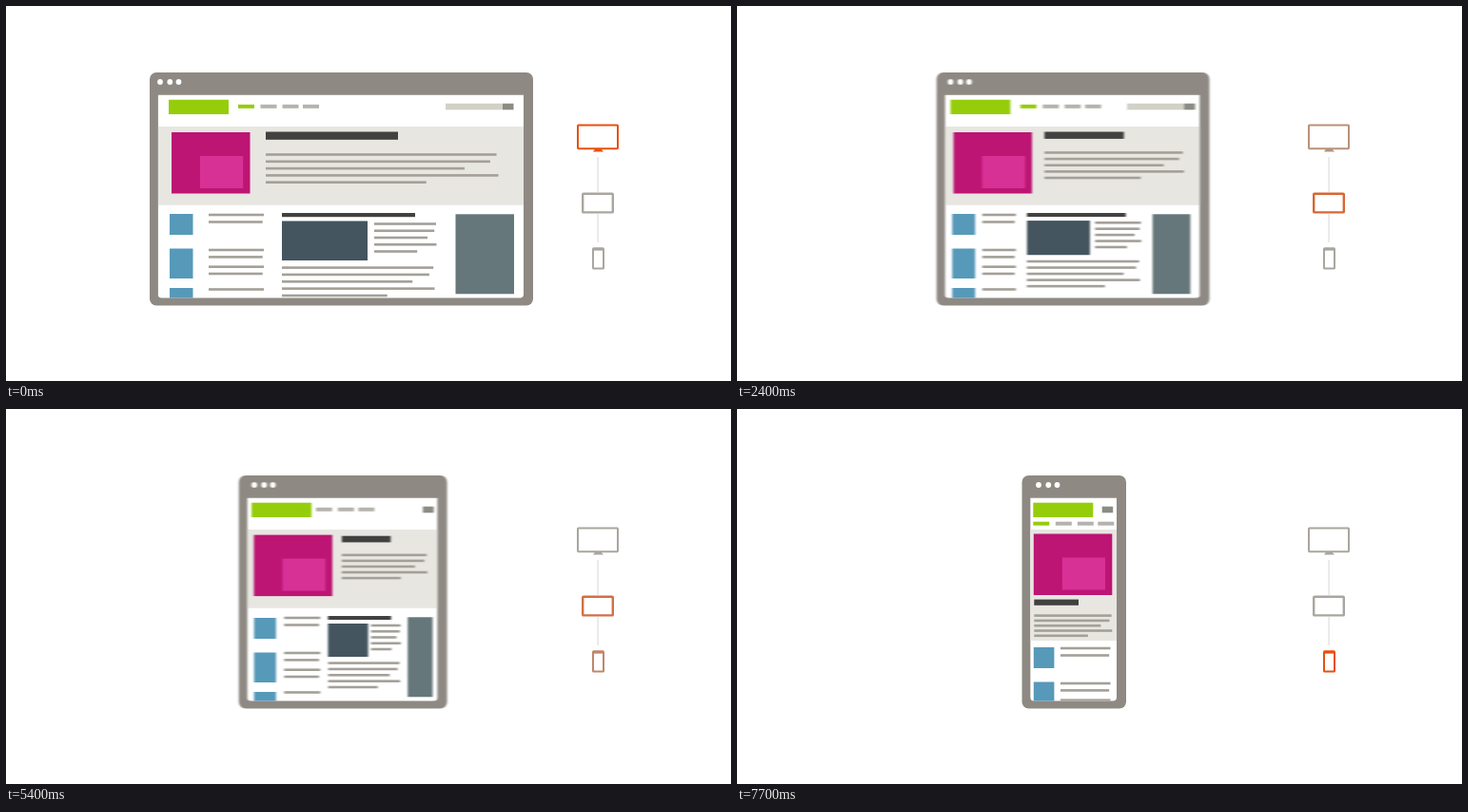
Recreate the animation shown at these times as an HTML page. Size 762 by 395 pixels, loop 8000 ms.

```html
<!DOCTYPE html>
<html lang="en">
<head>
<meta charset="utf-8">
<title>Responsive layout</title>
<style>
html, body { margin: 0; width: 100%; height: 100%; overflow: hidden; background: #fff; }
svg { display: block; width: 762px; height: 395px; }
</style>
</head>
<body>
<svg viewBox="0 0 762 395">
  <defs>
    <filter id="smear" filterUnits="userSpaceOnUse" x="0" y="0" width="762" height="395" color-interpolation-filters="sRGB">
      <feGaussianBlur stdDeviation="1.2 0"/>
    </filter>
    <clipPath id="page"><path id="pageShape"/></clipPath>
  </defs>
  <g id="scene"></g>
</svg>
<script>
const LOOP = 8000, STEP = 100;
const NAV_WRAP = 5600, STACK = 6300, BAR_HIDE = 2500;
const LINE = '#a3a098', DARK = '#424140';
const ORANGE = [232, 80, 15], GREY = [169, 166, 159];
const RAGGED = [.992, .965, .855, 1, .69];
const scene = document.getElementById('scene');
const pageShape = document.getElementById('pageShape');

// Blocks: [x, y, width, height]; paragraphs: [x, first y, width, line step]
const desktop = {
  logo: 171, nav: 244, search: 522, pink: [174, 133],
  title: [273, 132.5, 139, 8.3], intro: [273, 156.5, 244.5, 7.3],
  thumb: [172, 219, 24.5], list: [213, 58],
  head: [290, 218, 140, 4.2], photo: [290, 226.5, 90, 41.5],
  side: [387, 229.5, 65.5, 7.25], body: [290, 275.6, 160.5, 7.35],
  aside: [472.5, 61.5]
};
const tablet = {
  logo: 236, nav: 309.5, search: 458.7, pink: [239.2, 133],
  title: [334, 132.5, 71.5, 7.2], intro: [334, 154, 125.5, 6.5],
  thumb: [238, 219, 24], list: [267.5, 30.5],
  head: [308, 218, 96, 4], photo: [308, 226, 61, 35],
  side: [374, 228, 45, 6.25], body: [307.8, 267.6, 110, 6.35],
  aside: [429, 35]
};
const settled = { ...tablet, thumb: [239.2, 220, 22.8] };
const narrow = {
  logo: 291.3, nav: 291.5, search: 407.3, pink: [292.5, 132],
  title: [381.5, 135.5, 21, 6], intro: [381, 153.6, 37, 5.4],
  thumb: [293, 220, 23.5], list: [329.5, 49.5],
  head: [384, 218, 22, 4], photo: [384, 226, 14, 35],
  side: [398, 228, 11, 6.25], body: [384.5, 267.6, 24.5, 6.35],
  aside: [412, 13]
};
const phone = {
  logo: 311.3, nav: 311.3, search: 383.7, pink: [311.8, 131.5],
  title: [312.3, 200.6, 46.7, 6.2], intro: [312.3, 217.6, 82, 5.3],
  thumb: [311.8, 251, 21.6], list: [340, 52.5]
};

const layoutKeys = [[1250, desktop], [2650, tablet], [3000, tablet], [3900, settled], [5000, settled], [6000, narrow]];
// Window: left, right, offset of the first dot
const frameKeys = [
  [1250, [151, 554, 11]], [2650, [222.5, 484, 15.5]], [5000, [222.5, 484, 15.5]],
  [6000, [278, 433, 17.5]], [6400, [299.5, 409, 17.5]]
];

function mix(a, b, u) {
  if (typeof a === 'number') return a + (b - a) * u;
  if (Array.isArray(a)) return a.map((v, i) => mix(v, b[i], u));
  return Object.fromEntries(Object.keys(a).map(k => [k, mix(a[k], b[k], u)]));
}

// Beyond the last key the last segment continues
function sample(keys, t) {
  let i = 0;
  while (i < keys.length - 2 && t >= keys[i + 1][0]) i++;
  const [t0, a] = keys[i], [t1, b] = keys[i + 1];
  return mix(a, b, Math.max(0, (t - t0) / (t1 - t0)));
}

const clamp = v => Math.min(1, Math.max(0, v));
const rect = (x, y, w, h, fill, r = 0) =>
  `<rect x="${x}" y="${y}" width="${Math.max(0, w)}" height="${Math.max(0, h)}" rx="${r}" fill="${fill}"/>`;
const line = (x, y, w) => rect(x, y - 1.3, w, 2.6, LINE);
const paragraph = ([x, y, w, step]) => RAGGED.map((k, i) => line(x, y + i * step, w * k)).join('');

function header(s, t) {
  let out = rect(s.logo, 98.7, 63, 15.3, '#95cd0b');
  const wrapped = t >= NAV_WRAP;
  const navX = wrapped && t < STACK ? s.logo + .2 : s.nav;
  [0, 23.5, 46.5, 68].forEach((dx, i) => {
    out += rect(navX + dx, wrapped ? 118.7 : 103.8, 17, 4, i ? '#b5b3ad' : '#95cd0b');
  });
  if (t < BAR_HIDE) out += rect(s.search - 60, 102.7, 60, 6.6, '#d1d1c8');
  return out + rect(s.search, 102.7, 11.5, 6.6, '#8c8c85');
}

function list([x, y, w], [tx, tw]) {
  let out = '';
  [[0, 22], [36.5, 31.5], [78, 22]].forEach(([dy, h]) => out += rect(x, y + dy, w, h, '#5799b9'));
  [0, 7.5, 37, 44.4, 54.7, 62, 78.5].forEach((dy, i) =>
    out += line(tx, (y > 240 ? 252 : 220) + dy, tw - (i % 2 ? 1.3 : 0)));
  return out;
}

function page(s, t, left, right) {
  const [px, py] = s.pink;
  let out = rect(left, 93.5, right - left, 215, '#fff')
    + rect(left, 127, right - left, t >= STACK ? 117 : 82.7, '#e7e6e1')
    + header(s, t)
    + rect(px, py, 82.5, 64.5, '#bc1574')
    + rect(px + 30, py + 25, 45.2, 34, '#d73196')
    + rect(...s.title, DARK) + paragraph(s.intro) + list(s.thumb, s.list);
  if (s.head) {
    out += rect(...s.head, DARK) + rect(...s.photo, '#45555f')
      + paragraph(s.side) + paragraph(s.body)
      + rect(s.aside[0], 219.3, s.aside[1], 84, '#65777a');
  }
  return out;
}

function browser(t) {
  const [l, r, dot] = sample(frameKeys, Math.min(t, 6400));
  const left = l + 8.7, right = r - 10;
  const stacked = t >= STACK;
  const shift = stacked ? l - 299.5 : 0;
  const moving = (t > 1250 && t < 2650) || (t >= 5000 && t < 6400);
  pageShape.setAttribute('d',
    `M${left} 93.5H${right}V303.5q0 4-4 4H${left + 4}q-4 0-4-4Z`);
  const s = stacked ? phone : sample(layoutKeys, t);
  const dots = [0, 10.3, 19.5].map(d => `<circle cx="${l + dot + d}" cy="80" r="2.9" fill="#fff"/>`).join('');
  return `<g${moving ? ' filter="url(#smear)"' : ''}>`
    + rect(l, 70, r - l, 245.5, '#8e8982', 7) + dots
    + `<g clip-path="url(#page)"><g transform="translate(${shift})">${page(s, t, left - shift, right - shift)}</g></g></g>`;
}

function devices(t) {
  const first = clamp((t - 1200) / 1600), second = clamp((t - 4800) / 1600);
  const tint = u => `rgb(${mix(GREY, ORANGE, u).map(Math.round)})`;
  const outline = (x, y, w, h, sw, c) =>
    `<rect x="${x}" y="${y}" width="${w}" height="${h}" rx=".7" fill="#fff" stroke="${c}" stroke-width="${sw}"/>`;
  const a = tint(1 - first), b = tint(first - second), c = tint(second);
  return rect(621.4, 159, 1.4, 37, '#e3e3e3') + rect(621.4, 219, 1.4, 30, '#e3e3e3')
    + outline(601, 125.5, 42, 24.7, 2, a)
    + `<path d="M619.5 150H625L628 153.5H617Z" fill="${a}"/>`
    + outline(606.2, 197.8, 31.6, 19.6, 2.4, b)
    + outline(617, 255.3, 11, 21.3, 2, c) + rect(617, 255, 11, 2.6, c);
}

function draw(now) {
  const t = Math.floor(now % LOOP / STEP) * STEP;
  scene.innerHTML = browser(t) + devices(t);
  requestAnimationFrame(draw);
}
draw(performance.now());
</script>
</body>
</html>
```
